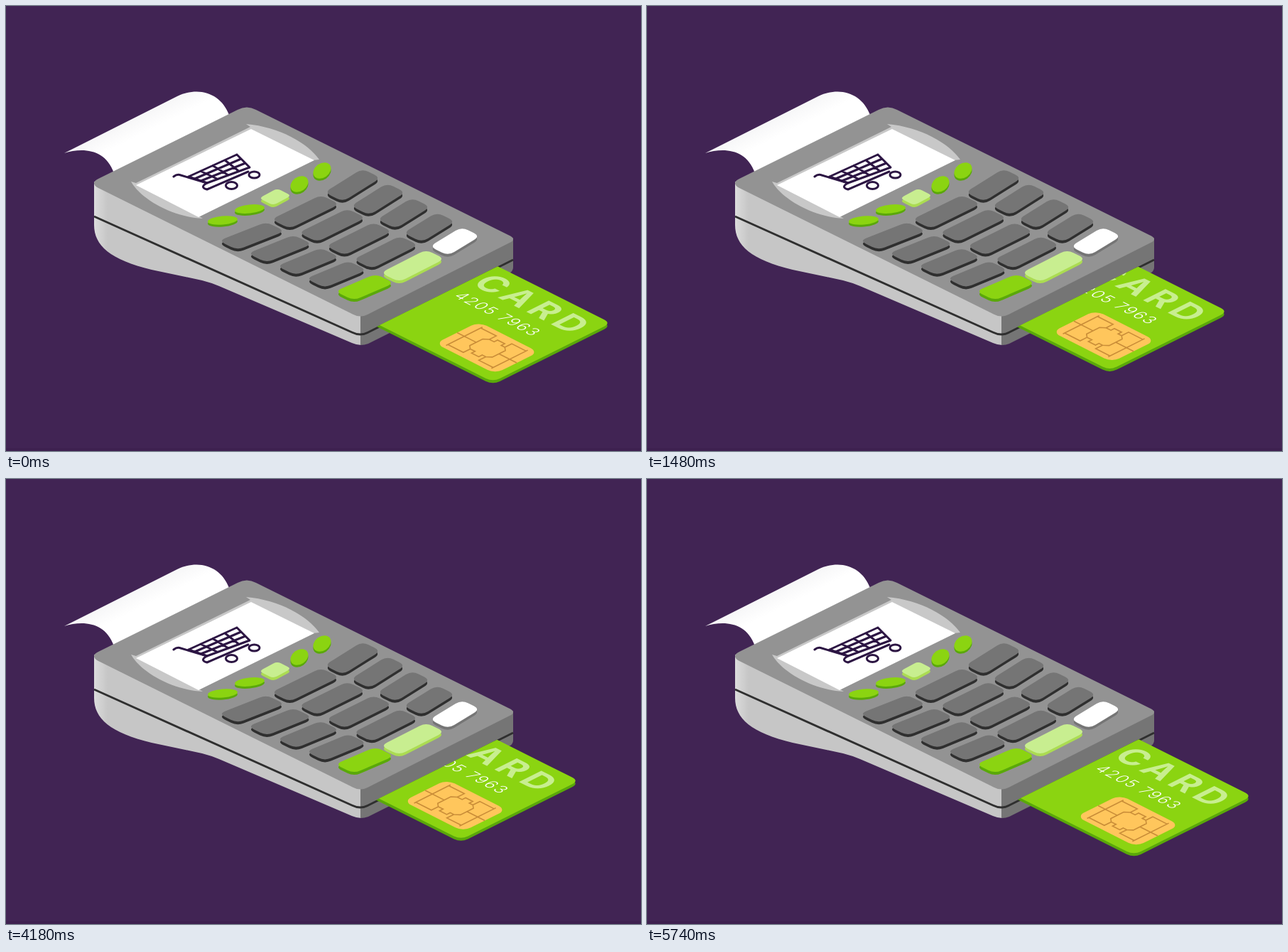
An HTML page for the animation above (8340 ms loop, 894 by 626 pixels).

```html
<!DOCTYPE html>
<html lang="en">
<head>
<meta charset="utf-8">
<title>Card terminal</title>
<style>
  html, body { margin: 0; width: 100%; height: 100%; overflow: hidden; background: #412454; }
  svg { display: block; }
  text { font-family: Inter, sans-serif; }
  #cart { fill: none; stroke-width: 3; stroke-linejoin: round; stroke-linecap: round; }
  #chip path { fill: none; stroke: #c98d38; stroke-width: 1.6; vector-effect: non-scaling-stroke; }
</style>
</head>
<body>
<svg width="894" height="626" viewBox="0 0 894 626">
  <defs>
    <linearGradient id="sideShade" gradientUnits="userSpaceOnUse" x1="124" x2="143" y1="0" y2="0">
      <stop stop-color="#dcdcdc"/><stop offset="1" stop-color="#c6c6c6"/>
    </linearGradient>
    <linearGradient id="paperShade" gradientUnits="userSpaceOnUse" x1="160" y1="166" x2="172" y2="190">
      <stop stop-color="#f6f6f7"/><stop offset="1" stop-color="#fff"/>
    </linearGradient>
    <clipPath id="slot"><path d="M500 462L714 355.500H894V626H500Z"/></clipPath>
  </defs>

  <path fill="url(#paperShade)" d="M82 207L241 127C273 112 303 124 314 153L152 235C140 201 108 199 82 207Z"/>

  <!-- terminal body -->
  <path fill="url(#sideShade)" d="M124 247V308C124 337 147 357 205 371L276 386Q288 389 300 394L487 474Q494 477 500 477V430Z"/>
  <path fill="#757575" d="M499 430L714 326V368Q714 373 708 376L512 474Q506 477 499 477Z"/>
  <path fill="none" stroke="#2f2f2f" stroke-width="3" d="M124 296L487 459Q499 465 510 459L714 357"/>
  <path fill="#939393" d="M124 249Q124 246 130 243L326 146Q339 139 352 146L707 322Q714 325 714 328Q714 331 709 333L509 434Q499 439 489 434L130 256Q124 253 124 249Z"/>

  <!-- screen -->
  <path fill="#c8c8c8" d="M176 247L183 249L344 170L338 166C385 170 425 193 441 216L432 217L272 296L277 299C235 297 190 272 176 247Z"/>
  <path fill="#fff" d="M183 252L345 173L434 217L271 297Z"/>
  <g id="cart">
    <path d="M236 240Q241 236 246 238L283 249Q272 255 283 258L341 233"/>
    <path id="basket"/>
    <ellipse cx="317.500" cy="252.500" rx="8" ry="5" fill="#fff"/>
    <ellipse cx="349.500" cy="237.500" rx="7.500" ry="4.500" fill="#fff"/>
  </g>
  <g id="keys"></g>

  <!-- bank card -->
  <g clip-path="url(#slot)"><g id="card">
    <g id="cardShape"></g>
    <text transform="matrix(.885 .4425 -.885 .4425 654 391)" font-size="49" font-weight="700" letter-spacing="7" fill="#c8ee90">CARD</text>
    <text transform="matrix(.885 .4425 -.885 .4425 629 408.500)" font-size="22" font-weight="300" letter-spacing="1.800" fill="#fff">4205 7963</text>
    <g id="chip" transform="matrix(.84 .425 .61 -.305 604.600 474.800)">
      <rect width="100" height="100" rx="13" ry="17" fill="#ffc65c"/>
      <path d="M32 35L38 28H46V20H58V28H64L70 35V65L64 72H58V80H46V72H38L32 65Z"/>
      <path d="M12 8V92M88 8V92M0 50H32M70 50H100M38 28V12H12M64 28V12H88M38 72V88H12M64 72V88H88"/>
    </g>
  </g></g>
  <rect y="622" width="894" height="4" fill="#3d204f"/>
</svg>
<script>
const $ = id => document.getElementById(id);
const GREEN = '#8bd411', GREEN_SIDE = '#5aa80a', LIGHT = '#c8ee90', LIGHT_SIDE = '#abdc52';
const GREY = '#757575', DARK = '#2f2f2f', INK = '#2c1543', RED = '#d3141f', PINK = '#ff7a82';

const mix = (a, b, k) => a.map((v, i) => v + (b[i] - v) * k);

function roundPath(points, r) {
  const n = points.length;
  const toward = (p, q) => mix(p, q, r / Math.hypot(q[0] - p[0], q[1] - p[1]));
  return points.map((p, i) =>
    `${i ? 'L' : 'M'}${toward(p, points[(i + n - 1) % n])}Q${p} ${toward(p, points[(i + 1) % n])}`
  ).join('') + 'Z';
}

// A flat shape with a visible lower edge.
const slab = (d, top, side) =>
  `<path d="${d}" fill="${side}" transform="translate(0 4)"/><path d="${d}" fill="${top}"/>`;

// Rounded parallelogram filling a bounding box; its short side runs (2, 1) down-right.
function key([x0, y0, x1, y1], top, side, depth = 13, r = 10) {
  const padX = .45 * r, padY = .22 * r;
  const left = x0 - padX, right = x1 + padX, upper = y0 - padY, lower = y1 - 4 + padY;
  return slab(roundPath([
    [left, lower - depth], [right - 2 * depth, upper],
    [right, upper + depth], [left + 2 * depth, lower]
  ], r), top, side);
}

function oval(x, y, rx, ry, angle) {
  const shape = (dy, fill) =>
    `<ellipse rx="${rx}" ry="${ry}" fill="${fill}" transform="translate(${x} ${y + dy}) rotate(${angle})"/>`;
  return shape(3, GREEN_SIDE) + shape(0, GREEN);
}

// Five evenly spaced keys between the first and the last box; the last one is coloured.
function keyColumn(first, last, top, side) {
  let out = '';
  for (let i = 0; i < 5; i++) {
    out += key(mix(first, last, i / 4), ...(i < 4 ? [GREY, DARK] : [top, side]));
  }
  return out;
}

$('keys').innerHTML =
  keyColumn([304, 306, 388, 345], [468, 379, 542, 416], GREEN, GREEN_SIDE) +
  keyColumn([378, 268, 465, 315], [532, 345, 613, 390], LIGHT, LIGHT_SIDE) +
  keyColumn([453, 231, 523, 277], [601, 313, 663, 353], '#fff', GREY) +
  oval(305, 301.5, 21, 6, -5) + oval(343, 285.5, 21, 6, -6) +
  oval(413, 250.5, 13.5, 10, -35) + oval(445, 231.5, 13.5, 10, -35) +
  '<g id="lamp"></g>';

// Basket: a grid of 4 by 3 cells stretched over four corners.
const [A, B, C, D] = [[257, 240], [325, 209], [343, 227], [283, 249]];
let grid = '';
for (let i = 0; i <= 4; i++) grid += `M${mix(A, B, i / 4)}L${mix(D, C, i / 4)}`;
for (let i = 0; i <= 3; i++) grid += `M${mix(A, D, i / 3)}L${mix(B, C, i / 3)}`;
$('basket').setAttribute('d', grid);

$('cardShape').innerHTML = slab(
  roundPath([[455.5, 413.8], [621.6, 330.8], [851.6, 446], [685.5, 528.8]], 11), GREEN, GREEN_SIDE);

const lampOn = key([358, 257, 401, 283], PINK, RED, 10, 6);
const lampOff = key([359, 258, 399, 283], LIGHT, LIGHT_SIDE, 10, 6);

// Linear progress in 30 ms ticks.
const ramp = (t, start, ticks) => Math.min(1, Math.max(0, Math.floor((t - start) / 30) / ticks));

let lampState;
function draw(now) {
  const t = now % 8340;
  const inserted = ramp(t, 640, 37) - ramp(t, 4420, 44);
  $('card').setAttribute('transform', `translate(${-45 * inserted} ${-21.5 * inserted})`);
  $('cart').setAttribute('stroke', t >= 2380 && t < 4150 ? RED : INK);
  const lit = [2380, 2850, 3380, 3880].some(on => t >= on && t < on + 300);
  if (lit !== lampState) {
    lampState = lit;
    $('lamp').innerHTML = lit ? lampOn : lampOff;
  }
}

const begin = performance.now();
function loop() {
  draw(performance.now() - begin);
  requestAnimationFrame(loop);
}
loop();
</script>
</body>
</html>
```
